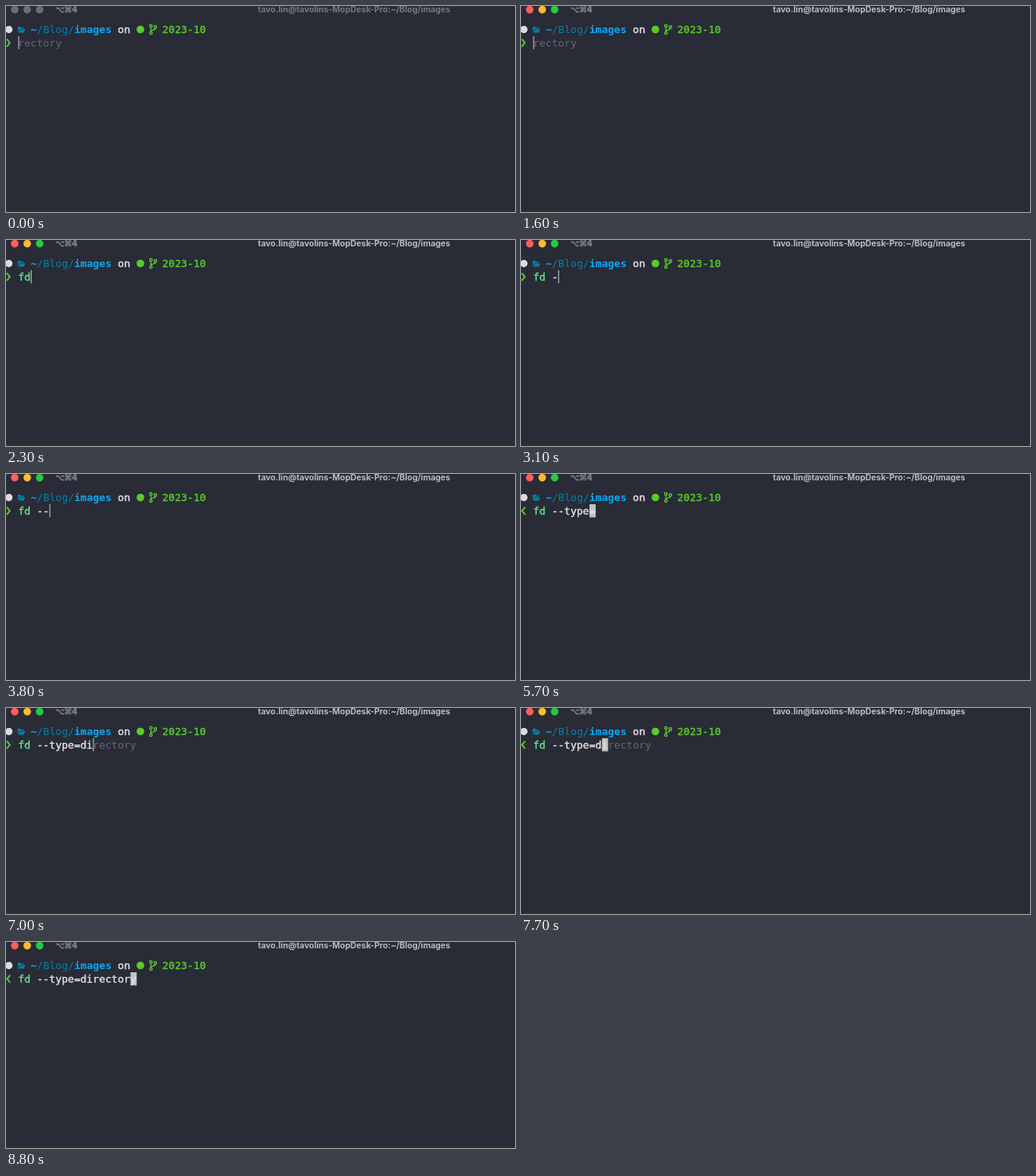
Animation, 640 px wide and 259 px high, one loop 8.9 s. Source, as an HTML page:

```html
<!DOCTYPE html>
<html lang="en">
<head>
<meta charset="utf-8">
<title>Terminal</title>
<style>
  html, body { margin: 0; width: 100%; height: 100%; overflow: hidden; background: #292b37; }
  svg { display: block; width: 640px; height: 259px; }
  text { white-space: pre; font: 13px "DejaVu Sans Mono", "Liberation Mono", monospace; }
  .bold { font-weight: 700; }
  .medium { stroke: currentColor; stroke-width: 0.4px; fill: currentColor; }
  .title { font: 700 10.45px Inter, "Liberation Sans", sans-serif; }
  .hint { font: 700 10px "DejaVu Sans", sans-serif; color: #7d7f86; }
  .line { fill: none; stroke: #5acb2a; }
</style>
</head>
<body>
<svg viewBox="0 0 640 259">
  <rect width="640" height="259" fill="#292b37"/>
  <rect y="257.5" width="640" height="1.5" fill="#064d08"/>

  <g id="lights">
    <circle cx="11" cy="4.6" r="4.8"/>
    <circle cx="26.7" cy="4.6" r="4.8"/>
    <circle cx="42.3" cy="4.6" r="4.8"/>
  </g>
  <text class="hint medium" x="62" y="8.2">⌥⌘4</text>
  <text class="title" id="title" x="437.7" y="8.2" text-anchor="middle">tavo.lin@tavolins-MopDesk-Pro:~/Blog/images</text>

  <circle cx="3.6" cy="29.6" r="4.6" fill="#dcdcde"/>
  <path d="M14.8 33.5V26h3.3l1 1.2h3.4v1.5h-5.2zM15.6 33.5l2.2-4h6.6l-2.2 4z" fill="#0a80a6"/>
  <text x="31" y="34" fill="#0a80a6"><tspan class="bold" fill="#0fa8f5">~</tspan>/Blog/<tspan class="bold" fill="#0fa8f5">images</tspan><tspan class="medium" color="#e2e2e4"> on</tspan></text>
  <circle cx="169" cy="29.5" r="4.8" fill="#5acb2a"/>
  <g class="line" stroke-width="1.4">
    <circle cx="182.2" cy="25" r="1.6"/>
    <circle cx="182.2" cy="34" r="1.6"/>
    <circle cx="187.8" cy="26.4" r="1.6"/>
    <path d="M182.2 26.7v5.6M187.8 28c0 3-5.6 1.4-5.6 4.2"/>
  </g>
  <text class="medium" x="196.5" y="34" color="#5acb2a">2023-10</text>

  <path id="prompt" class="line" stroke-width="2"/>
  <rect id="cursor" y="38" height="16.5" fill="#c2c2c4"/>
  <text x="15.2" y="50.7"><tspan id="command" class="medium" color="#62e88a"></tspan><tspan id="args" class="medium" color="#e2e2e4"></tspan><tspan id="ghost" fill="#666872"></tspan></text>
</svg>
<script>
  const LOOP = 8900, FOCUS = 400, CELL = 7.826;

  // time, typed text, suggestion, normal mode
  const steps = [
    [0, "", "rectory"],
    [1800, "f", ""],
    [2100, "fd", ""],
    [2600, "fd ", ""],
    [2900, "fd -", ""],
    [3500, "fd --", ""],
    [4000, "fd --t", "ype="],
    [4400, "fd --ty", "pe="],
    [5000, "fd --ty", "pe=", true],
    [5500, "fd --type=", "", true],
    [6000, "fd --type=", ""],
    [6500, "fd --type=d", "irectory"],
    [6900, "fd --type=di", "rectory"],
    [7400, "fd --type=di", "rectory", true],
    [7900, "fd --type=directory", "", true]
  ];

  const el = id => document.getElementById(id);
  const [lights, title, prompt, cursor, command, args, ghost] =
    ["lights", "title", "prompt", "cursor", "command", "args", "ghost"].map(el);
  const colours = ["#ff5f57", "#febc2e", "#28c840"];

  function draw(t) {
    const active = t >= FOCUS;
    [...lights.children].forEach((dot, i) => dot.setAttribute("fill", active ? colours[i] : "#6c6d74"));
    title.setAttribute("fill", active ? "#babbc0" : "#777980");

    const [, typed, hint, normal] = steps.filter(s => s[0] <= t).pop();
    command.textContent = typed.slice(0, 2);
    args.textContent = typed.slice(2);
    ghost.textContent = hint;
    prompt.setAttribute("d", normal ? "M5.2 41.5L1.4 46.3L5.2 51.1" : "M1 41.5L4.8 46.3L1 51.1");

    const column = 2 + typed.length - (normal ? 1 : 0);
    cursor.setAttribute("x", column * CELL - (normal ? 0 : 0.2));
    cursor.setAttribute("width", normal ? CELL : 1.1);
  }

  const start = performance.now();
  function frame() {
    draw((performance.now() - start) % LOOP);
    requestAnimationFrame(frame);
  }
  frame();
</script>
</body>
</html>
```
